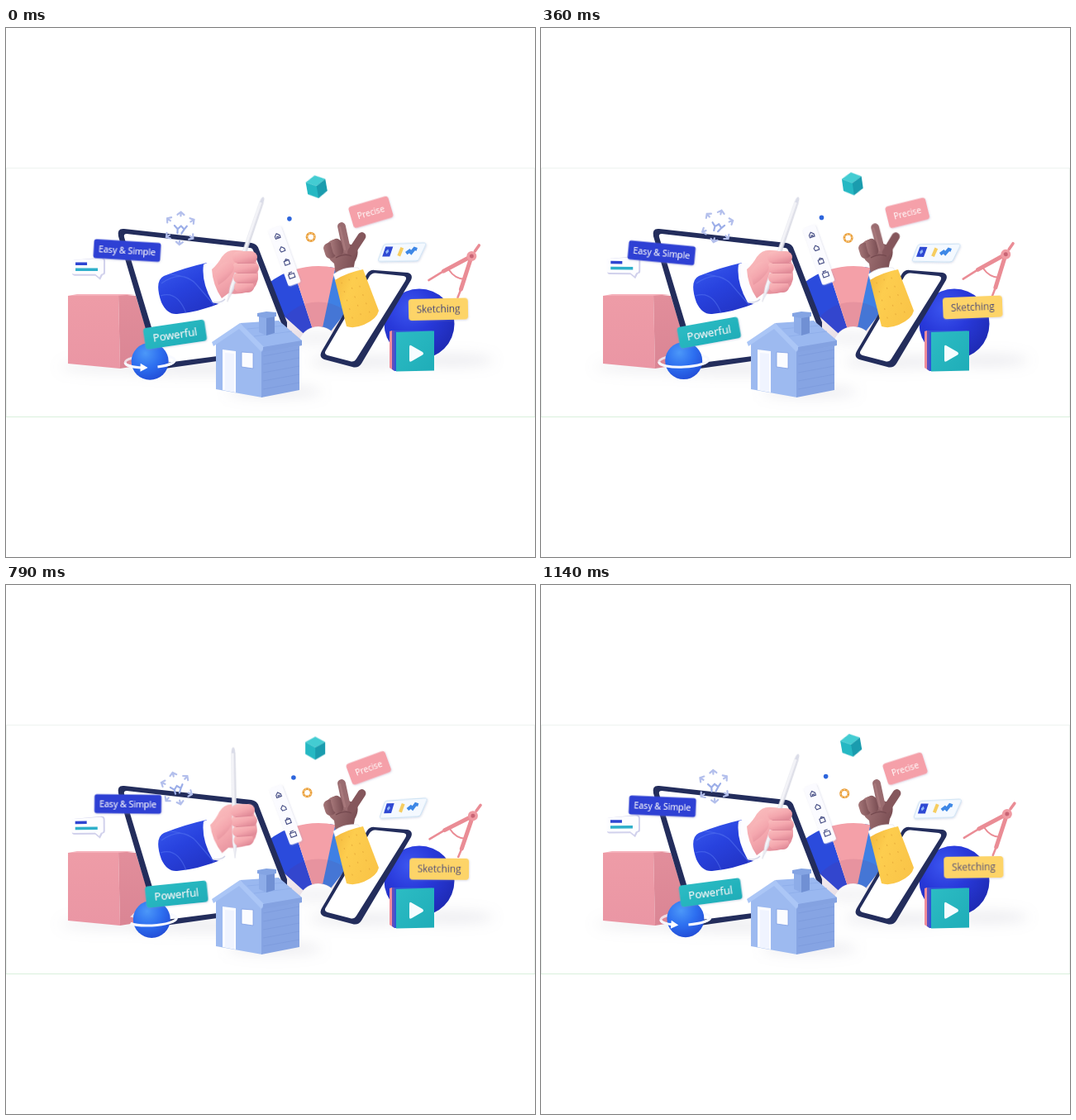
Recreate the animation shown at these times as an HTML page without scripts. Size 640 px wide and 640 px high, loop 1210 ms.

```html
<!DOCTYPE html>
<html lang="en">
<head>
<meta charset="utf-8">
<title>Creative tools</title>
<style>
@property --t { syntax: "<number>"; inherits: true; initial-value: 0; }
@property --p { syntax: "<number>"; inherits: true; initial-value: 32; }

html, body { margin: 0; width: 100%; height: 100%; overflow: hidden; background: #fff; }
svg { display: block; width: 100vw; height: 100vh; animation: clock 1.21s steps(17) -4ms infinite, orbit 1.21s steps(10) infinite; }
text { font-family: "Open Sans", "Noto Sans", sans-serif; text-anchor: middle; fill: #fff; }

/* One loop is seventeen held poses: --t is the phase, --p the place of the arrow on its ring. */
@keyframes clock { from { --t: 0; } to { --t: 1; } }
@keyframes orbit {
  0% { --p: 32; animation-timing-function: steps(3); }
  17.3% { --p: -3; }
  76.8% { --p: -50; animation-timing-function: steps(4); }
  to { --p: -68; }
}

/* Floating parts swing in a sine wave between +(x, y, r) and its opposite. */
.bob {
  --w: cos(calc(var(--t) * 360deg - 80deg));
  transform: translate(calc(var(--x) * var(--w)), calc(var(--y) * var(--w))) rotate(calc(var(--r, 0deg) * var(--w)));
}
.spin { transform: rotate(calc(var(--t) * 360deg)); }
.gap { stroke-dasharray: 86 14; stroke-dashoffset: calc(var(--p) * -1px); }
.arrow {
  offset-path: path("M30 0A30 7.5 0 0 1-30 0A30 7.5 0 0 1 30 0Z");
  offset-distance: calc(var(--p) * 1%);
  offset-rotate: auto 180deg;
}

.pen, .fist, .tumble, .spread { animation: pen 1.21s steps(2) infinite; }
@keyframes pen {
  0%, 41.3% { transform: translate(289.5px, 268px) rotate(19deg); }
  52.8% { transform: translate(285px, 267.5px) rotate(12.2deg); }
  65.2% { transform: translate(276px, 263.5px) rotate(-1deg); }
  76.8% { transform: translate(303.5px, 281px) rotate(43deg); animation-timing-function: steps(3); }
  94.1%, to { transform: translate(289.5px, 268px) rotate(19deg); }
}
.fist { animation-name: fist; transform-origin: 252px 305px; }
@keyframes fist {
  0%, 52.8%, 94.1%, to { transform: none; }
  65.2% { transform: translate(-1px, -2px) rotate(-4deg); }
  76.8% { transform: translate(4px, 4px) rotate(3deg); animation-timing-function: steps(3); }
}
.tumble { animation-name: tumble; }
@keyframes tumble {
  0% { transform: rotate(-10deg); animation-timing-function: steps(3); }
  17.3% { transform: rotate(0); animation-timing-function: steps(4); }
  41.3% { transform: rotate(-16deg); }
  52.8%, 65.2% { transform: rotate(0); }
  76.8% { transform: rotate(-22deg); animation-timing-function: steps(3); }
  94.1%, to { transform: rotate(-10deg); }
}
.spread { animation-name: spread; transform-origin: 412px 270px; }
@keyframes spread {
  0% { transform: none; animation-timing-function: steps(3); }
  17.3% { transform: translate(-1px, 2px) rotate(-5deg); animation-timing-function: steps(4); }
  41.3%, to { transform: none; }
}
</style>
</head>
<body>
<svg viewBox="0 0 640 640">
<defs>
  <filter id="soft" x="-30%" y="-80%" width="160%" height="260%"><feGaussianBlur stdDeviation="8"/></filter>
  <filter id="lift" x="-30%" y="-30%" width="160%" height="170%"><feDropShadow dx=".5" dy="1" stdDeviation="1" flood-color="#8088b8" flood-opacity=".3"/></filter>
  <linearGradient id="rose" x2="0" y2="1"><stop stop-color="#ee9ca7"/><stop offset="1" stop-color="#ea96a4"/></linearGradient>
  <linearGradient id="roseSide" x2="0" y2="1"><stop stop-color="#e28e9b"/><stop offset="1" stop-color="#da8594"/></linearGradient>
  <linearGradient id="sleeve" x2=".7" y2="1"><stop stop-color="#3a5cf0"/><stop offset=".5" stop-color="#2842de"/><stop offset="1" stop-color="#2233c4"/></linearGradient>
  <linearGradient id="gold" x2="1" y2=".5"><stop stop-color="#f3b63c"/><stop offset=".4" stop-color="#fdcd4e"/><stop offset="1" stop-color="#fac548"/></linearGradient>
  <linearGradient id="skin" x2=".6" y2="1"><stop stop-color="#fbc0c0"/><stop offset=".6" stop-color="#f4a7ae"/><stop offset="1" stop-color="#e18b98"/></linearGradient>
  <linearGradient id="brown" x2="1" y2=".3"><stop stop-color="#a97a7c"/><stop offset="1" stop-color="#7d5156"/></linearGradient>
  <linearGradient id="shaft" x2="1"><stop stop-color="#fff"/><stop offset=".55" stop-color="#eeeef4"/><stop offset="1" stop-color="#c8cad6"/></linearGradient>
  <linearGradient id="teal" x2="1" y2="1"><stop stop-color="#2cbcc4"/><stop offset="1" stop-color="#1fadb8"/></linearGradient>
  <radialGradient id="orb" cx=".36" cy=".28" r=".8"><stop stop-color="#3c56f0"/><stop offset=".45" stop-color="#2839da"/><stop offset="1" stop-color="#1d29b0"/></radialGradient>
  <radialGradient id="globe" cx=".38" cy=".28" r=".8"><stop stop-color="#4c98f8"/><stop offset=".5" stop-color="#2d6ff0"/><stop offset="1" stop-color="#2149d4"/></radialGradient>
  <clipPath id="front"><path d="M-45 0H45V30H-45Z"/></clipPath>
  <path id="chev" d="M-4 2.5L0-.8 4 2.5M0-.8V4"/>
  <circle id="leaf" r="61.5" pathLength="360" fill="none" stroke-width="73" stroke-dasharray="30 330"/>
  <g id="ring">
    <ellipse class="gap" rx="30" ry="7.5" pathLength="100" fill="none" stroke="#f6f8ff" stroke-width="3"/>
    <path class="arrow" d="M-3-5L6 0-3 5Z" fill="#fff"/>
  </g>
</defs>

<path d="M0 169.5H640M.5 169V470M639.5 169V470" fill="none" stroke="#eef3f0"/>
<path d="M0 470.5H640" stroke="#d9f0dc"/>

<!-- floor shadows -->
<g filter="url(#soft)" fill="#9a9cae">
  <ellipse cx="125" cy="410" rx="60" ry="7" opacity=".16"/>
  <ellipse cx="235" cy="412" rx="85" ry="8" opacity=".18"/>
  <ellipse cx="325" cy="440" rx="58" ry="7" opacity=".2"/>
  <ellipse cx="430" cy="404" rx="65" ry="7" opacity=".2"/>
  <ellipse cx="540" cy="402" rx="50" ry="7" opacity=".2"/>
  <ellipse cx="375" cy="375" rx="35" ry="7" opacity=".15"/>
</g>

<!-- colour fan -->
<g transform="translate(378 386)">
  <use href="#leaf" stroke="#2b4bdc" transform="rotate(-138)"/>
  <use href="#leaf" stroke="#3f80e4" transform="rotate(-82)"/>
  <use href="#leaf" stroke="#f4a0a8" transform="rotate(-108)"/>
  <path d="M-51-20A55 55 0 0 1 51-20L23-9A25 25 0 0 0-23-9Z" fill="#7a2050" opacity=".1"/>
</g>

<!-- rose box -->
<path d="M75 324L136 322 138 412 75 406Z" fill="url(#rose)"/>
<path d="M136 322L157 324 182 405 138 412Z" fill="url(#roseSide)"/>
<path d="M75 324L86 322H157L136 324Z" fill="#f5b0ba"/>

<!-- tablet -->
<path d="M143 243L297 260Q304 261 306 268L340 356V391L192 412Q184 413 181 405L136 252Q134 242 143 243Z" fill="#232d5c"/>
<path d="M146 249L295 266Q298 266 299 269L333 357V387L194 405Q189 406 188 402L143 253Q142 249 146 249Z" fill="#fff"/>

<!-- move symbol -->
<g transform="translate(210 243)">
  <g class="bob" style="--x:4px;--y:-3.5px;--r:16deg">
    <g fill="none" stroke="#b3bfec" stroke-width="2.2" stroke-linecap="round">
      <use href="#chev" y="-19"/>
      <use href="#chev" y="-19" transform="rotate(55)"/>
      <use href="#chev" y="-19" transform="rotate(125)"/>
      <use href="#chev" y="-19" transform="rotate(180)"/>
      <use href="#chev" y="-19" transform="rotate(235)"/>
      <use href="#chev" y="-19" transform="rotate(305)"/>
      <path d="M-7-3L-3 1 1-3M-3 1V6M2-2L5 1 8-3M5 1L2 6" stroke="#9caee8"/>
    </g>
  </g>
</g>

<!-- icon strip -->
<g transform="translate(337.3 276.3)">
  <g class="bob" style="--x:-1.5px;--y:-2px;--r:.5deg">
    <g transform="rotate(-20)">
      <rect x="-8" y="-36.5" width="16" height="73" rx="3" fill="#fbfbff" filter="url(#lift)"/>
      <g fill="none" stroke="#454d84" stroke-width="1.1">
        <path d="M-3-26L0-29 3-26V-23H-3ZM-1-23V-25H1V-23"/>
        <path d="M-3-9L0-12 3-9V-6H-2Z"/>
        <path d="M-3 6H3V11H-3ZM-2 6L0 4 3 6"/>
        <path d="M-3.5 23H3.5V28H-3.5ZM-2 23V21H2"/>
      </g>
    </g>
  </g>
</g>

<!-- little floaters -->
<g transform="translate(343.7 231.2)"><circle class="bob" style="--x:-4.7px;--y:-2px" r="2.8" fill="#2d65dc"/></g>
<g transform="translate(368 252.6)">
  <g class="bob" style="--x:4px;--y:1.5px">
    <circle r="4.7" fill="none" stroke="#e79a35" stroke-width="2.7"/>
    <circle class="spin" r="4.7" fill="none" stroke="#f9cb83" stroke-width="1.4" stroke-dasharray="2 1.7"/>
  </g>
</g>
<g transform="translate(375.5 193)">
  <g class="bob" style="--x:1.5px;--y:-5px">
    <g class="tumble">
      <path d="M0-14L12-7.5 0-1-12-7.5Z" fill="#43ccd2"/>
      <path d="M-12-7.5L0-1V14L-12 7Z" fill="#25b8c3"/>
      <path d="M12-7.5L0-1V14L12 7Z" fill="#1a9cae"/>
    </g>
  </g>
</g>

<!-- arm with pen -->
<path d="M191 300Q216 290 243 284L262 332Q232 344 207 346Q195 347 188 332Q179 306 191 300Z" fill="url(#sleeve)"/>
<path d="M188 309Q214 291 231 311T252 335M198 298Q222 300 231 311M187 324Q207 317 218 345" fill="none" stroke="#5879f2" stroke-width="1.2" opacity=".5"/>
<path d="M239 286Q246 282 252 285L266 326Q266 332 258 334L250 332Q236 308 239 286Z" fill="#fdfdff"/>
<path d="M251 332Q260 333 265 328" fill="none" stroke="#cfd2e6" stroke-width="1.4"/>
<path class="fist" d="M249 292Q256 286 261 277Q268 267 280 269L294 270Q304 276 304 291Q308 311 295 319Q280 323 269 321L261 327Q250 311 249 292Z" fill="url(#skin)"/>
<g class="pen">
  <path d="M-2.200-60Q-1.600-67 0-67T2.200-60L2.700 48 0 67-2.700 48Z" fill="url(#shaft)" stroke="#d4d6e2" stroke-width=".5"/>
  <path d="M-2.200-60Q-1.600-67 0-67T2.200-60Z" fill="#dadce8"/>
</g>
<g class="fist" fill="url(#skin)">
  <rect x="276" y="306" width="24" height="14" rx="7"/>
  <rect x="275" y="295" width="30" height="14" rx="7"/>
  <rect x="274" y="283" width="32" height="14" rx="7"/>
  <rect x="274" y="270" width="30" height="15" rx="7.5"/>
  <path d="M253 296Q262 279 273 284Q278 288 274 295Q268 304 257 311Z"/>
  <path d="M280 284.500H302M280 296.500H303M280 308H299" fill="none" stroke="#df8a98" stroke-width="1"/>
</g>

<!-- big ball -->
<circle cx="500" cy="358" r="42.500" fill="url(#orb)"/>

<!-- phone -->
<path d="M446 293L486 296Q493 298 490 305L430 406Q426 412 419 410L385 401Q378 398 382 391L437 297Q441 292 446 293Z" fill="#232d5c"/>
<path d="M447 296.500L481 300Q486 301 483 306L424 400Q421 405 416 403L389 396Q384 394 387 390L440 300Q443 296 447 296.500Z" fill="#fff"/>

<!-- raised hand -->
<g fill="url(#brown)">
  <path d="M387 263Q394 253 404 257L414 261 424 264Q428 273 422 283L420 294 399 299 397 285Q386 277 387 263Z"/>
  <g class="spread" fill="none" stroke-width="9.800" stroke-linecap="round">
    <path d="M412 268L406 240" stroke="#9a6c70"/>
    <path d="M418 271L430.500 252" stroke="#85575c"/>
    <path d="M410 268L404 241" stroke="#b18082" stroke-width="2.500" opacity=".6"/>
  </g>
  <rect x="385" y="260" width="13" height="19" rx="6" transform="rotate(-18 391 269)"/>
  <rect x="394" y="255" width="13" height="21" rx="6" transform="rotate(-16 400 265)"/>
  <path d="M399 278Q410 272 418 276" fill="none" stroke="#74494f" stroke-width="1.2"/>
</g>
<path d="M396 298Q409 288 426 290L431 298 400 309Z" fill="#fff" stroke="#e4e5ee" stroke-width=".7"/>
<path d="M398 305Q412 296 432 292L451 342Q449 352 433 359Q421 364 412 361Z" fill="url(#gold)"/>
<g stroke="#e6ab3a" stroke-width="1.2" stroke-linecap="round" stroke-dasharray="1 10" fill="none" opacity=".8">
  <path d="M406 308L421 357M415 304L431 352M424 302L441 347"/>
</g>

<!-- dividers -->
<g transform="translate(563.6 276.500)">
  <g class="bob" style="--x:-1.5px;--y:-3px;--r:-1deg">
    <g fill="none" stroke="#ea8c95" stroke-linecap="round">
      <path d="M0 0L-34 18M0 0L-13 40" stroke-width="5"/>
      <path d="M-34 18L-52 29M-13 40L-17 50" stroke-width="2.500"/>
      <path d="M-28 16Q-20 28-8 28" stroke-width="2"/>
      <path d="M4-6L9-13" stroke-width="3.500"/>
    </g>
    <circle r="6" fill="#ef9aa2"/><circle r="2.500" fill="#c96575"/>
  </g>
</g>

<!-- video booklet -->
<path d="M464 367L467 366V413L464 411Z" fill="#f08d9b"/>
<path d="M467 366L470 366V415L467 413Z" fill="#5a4fc0"/>
<path d="M470 366H516V368H473V415H470Z" fill="#2f56d8"/>
<path d="M472 368L518 366.500V414.500L472 415.500Z" fill="url(#teal)"/>
<path d="M490 384Q488 383 488 386V402Q488 405 491 403L504 395.500Q506 394 504 392Z" fill="#f6fcff"/>

<!-- tool card -->
<g transform="translate(479.500 270.500)">
  <g class="bob" style="--x:-1.5px;--y:1px;--r:2deg">
    <path d="M-20-9L26-11Q30-11 28-7L21 8Q20 11 17 11L-26 12Q-30 12-28 8L-23-6Q-22-9-20-9Z" fill="#f4f9ff" stroke="#c8e0f3" filter="url(#lift)"/>
    <path d="M-20-6H-11L-15 6H-24Z" fill="#2e49d3"/>
    <path d="M-17-3L-16 0-19 3-20 0Z" fill="#91b7f8"/>
    <path d="M0-5L-4 5" stroke="#f6cd60" stroke-width="4"/>
    <path d="M5 2L9-1 11 1 15-4 18-3" fill="none" stroke="#3d87e6" stroke-width="4"/>
  </g>
</g>

<!-- chat bubble -->
<g transform="translate(99 290)">
  <g class="bob" style="--x:.3px;--y:-2px;--r:.5deg">
    <path d="M-17-9L17-12Q21-12 21-8V6Q21 9 18 9L15 15 9 10-16 10Q-19 10-19 7V-6Q-19-9-17-9Z" fill="#d1d1ec"/>
    <path d="M-18-9L15-11Q19-11 19-8V5Q19 8 16 8L14 12 9 8H-17Q-20 8-20 5V-6Q-20-9-18-9Z" fill="#fdfdff"/>
    <path d="M-15-4.500H-1" stroke="#2e45d2" stroke-width="3.500"/>
    <path d="M-15 2.500H12" stroke="#2eafca" stroke-width="3.500"/>
  </g>
</g>

<!-- ringed globe -->
<g transform="translate(174.500 403.500)">
  <g class="bob" style="--x:-2px;--y:-1px">
    <g transform="rotate(-3)"><use href="#ring" opacity=".75"/></g>
    <circle r="22.500" fill="url(#globe)"/>
    <g transform="rotate(-3)" clip-path="url(#front)"><use href="#ring"/></g>
  </g>
</g>

<!-- house -->
<path d="M254 382L283 359 310 387V447L254 437Z" fill="#9dbaf0"/>
<path d="M309 388L355 380V438L309 447Z" fill="#86a4e3"/>
<path d="M311 397L355 389M311 407L355 399M311 417L355 409M311 427L355 419M311 437L355 429" stroke="#7c9adb" stroke-width=".7"/>
<path d="M283 357L330 354 358 378V384L311 391Z" fill="#9ab8f0"/>
<path d="M283 357L249 380 251 385 282 364 309 392 312 386Z" fill="#abc6f6"/>
<path d="M311 386L358 378V384L311 392Z" fill="#84a2e1"/>
<path d="M292 364L337 360M300 373L346 367" stroke="#8cabe8" stroke-width=".7"/>
<path d="M306 346L315 348V372L306 368Z" fill="#8dace8"/>
<path d="M315 348L325 345V369L315 372Z" fill="#7090d4"/>
<path d="M304 345L315 343 327 344V349L315 351 304 349Z" fill="#84a4e3"/>
<path d="M262 389L278 391V441L262 438Z" fill="#fbfcff"/>
<path d="M265 393L276 394V440L265 438Z" fill="#f0f4ff"/>
<path d="M285 392L299 393V412L285 410Z" fill="#fbfcff" stroke="#7f9fe2" stroke-width=".8"/>

<!-- labels -->
<g transform="translate(146.700 268.500) rotate(3)">
  <g class="bob" style="--x:-.7px;--y:4px;--r:2.7deg" filter="url(#lift)">
    <rect x="-40.500" y="-11.500" width="81" height="23" rx="3" fill="#2d41d4"/>
    <text y="4" font-size="10.600">Easy &amp; Simple</text>
  </g>
</g>
<g transform="translate(204.800 371.300) rotate(-8)">
  <g class="bob" style="--x:-1.3px;--y:-3.3px;--r:-2.500deg" filter="url(#lift)">
    <rect x="-37.500" y="-13" width="75" height="26" rx="4" fill="url(#teal)"/>
    <text y="4.800" font-size="13">Powerful</text>
  </g>
</g>
<g transform="translate(441 222.500) rotate(-17)">
  <g class="bob" style="--x:2px;--y:2px;--r:3.500deg" filter="url(#lift)">
    <rect x="-25" y="-13.500" width="50" height="27" rx="4" fill="#f5a0a9"/>
    <text y="3.800" font-size="10.200">Precise</text>
  </g>
</g>
<g transform="translate(523.200 340.800) rotate(-1)">
  <g class="bob" style="--x:-1px;--y:-3.200px;--r:-1.500deg" filter="url(#lift)">
    <rect x="-36" y="-13" width="72" height="26" rx="4" fill="#fdd468"/>
    <text y="4.200" font-size="11.800" style="fill:#353b78">Sketching</text>
  </g>
</g>
</svg>
</body>
</html>
```
